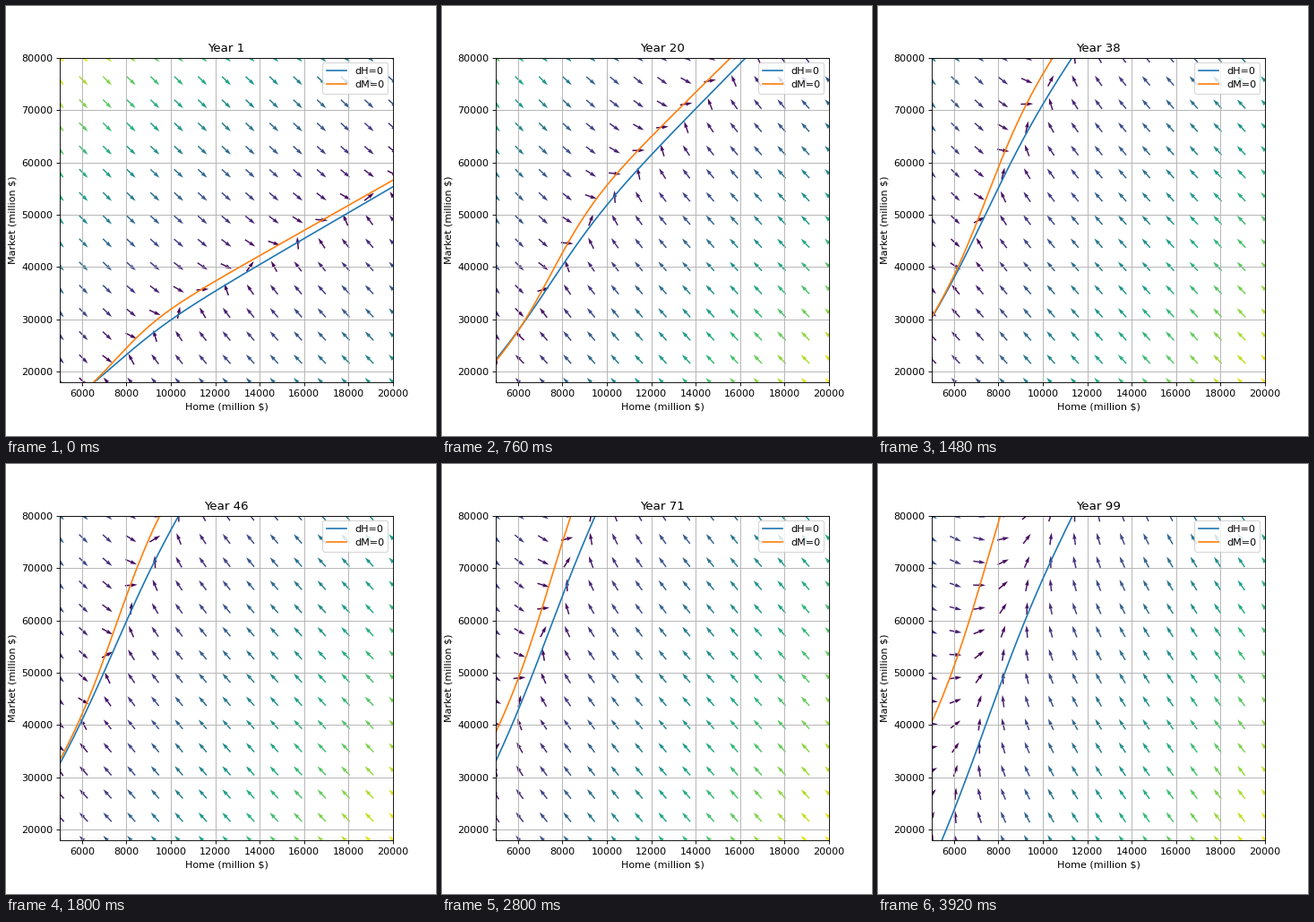
Write a matplotlib script that moves like this. It is 480 px wide and 480 px high and loops after 4.04 s.

```python
import numpy as np
import matplotlib.pyplot as plt
from matplotlib.animation import FuncAnimation

STEPS = 101
LAST_YEAR = 99
X_RANGE = (5000, 20000)
Y_RANGE = (18000, 80000)


def sigmoid(z):
    return 1 / (1 + np.exp(-z))


def growth(year):
    """Logistic growth, equal to 1 in the first year."""
    return 3.26 / (1 + 2.26 * np.exp(-0.05 * (year - 1)))


def home_balance(home, year):
    """Market value at which home stops changing."""
    h = home / 1000
    shape = 2.47 * h + 6.15 * sigmoid(0.78 * (h - 7.45))
    drain = 0.213 * np.exp(0.05 * (year - 1))
    return 1000 * (growth(year) * shape - drain)


def market_balance(home, year):
    """Market value at which market stops changing."""
    h = home / 1000
    shape = 2.4 * h + 8.6 * sigmoid(h - 7.5)
    return 1000 * growth(year) * shape


def field(year):
    """Unit direction and speed on the arrow grid."""
    dh = grid_m - home_balance(grid_h, year)
    dm = market_balance(grid_h, year) - grid_m
    speed = np.hypot(dh, dm)
    return dh / speed, dm / speed, speed


grid_h, grid_m = np.meshgrid(np.linspace(*X_RANGE, 15), np.linspace(*Y_RANGE, 15))
xs = np.linspace(*X_RANGE, 150)

fig, ax = plt.subplots(figsize=(6, 6), dpi=80)
fig.subplots_adjust(left=0.125, right=0.9, bottom=0.125, top=0.88)
ax.set_xlim(*X_RANGE)
ax.set_ylim(*Y_RANGE)
ax.set_xticks(range(6000, 20001, 2000))
ax.set_yticks(range(20000, 80001, 10000))
ax.set_xlabel("Home (million $)")
ax.set_ylabel("Market (million $)")
ax.grid(True)

title = ax.set_title("Year 1")
arrows = ax.quiver(grid_h, grid_m, *field(1), pivot="mid", cmap="viridis")
home_line, = ax.plot(xs, home_balance(xs, 1), label="dH=0")
market_line, = ax.plot(xs, market_balance(xs, 1), label="dM=0")
ax.legend(loc="upper right")


def update(step):
    year = min(step + 1, LAST_YEAR)
    u, v, speed = field(year)
    arrows.set_UVC(u, v, speed)
    arrows.set_clim(speed.min(), speed.max())
    home_line.set_ydata(home_balance(xs, year))
    market_line.set_ydata(market_balance(xs, year))
    title.set_text(f"Year {year}")
    return arrows, home_line, market_line, title


anim = FuncAnimation(fig, update, frames=STEPS, interval=40, repeat=True, blit=False)
plt.show()
```
